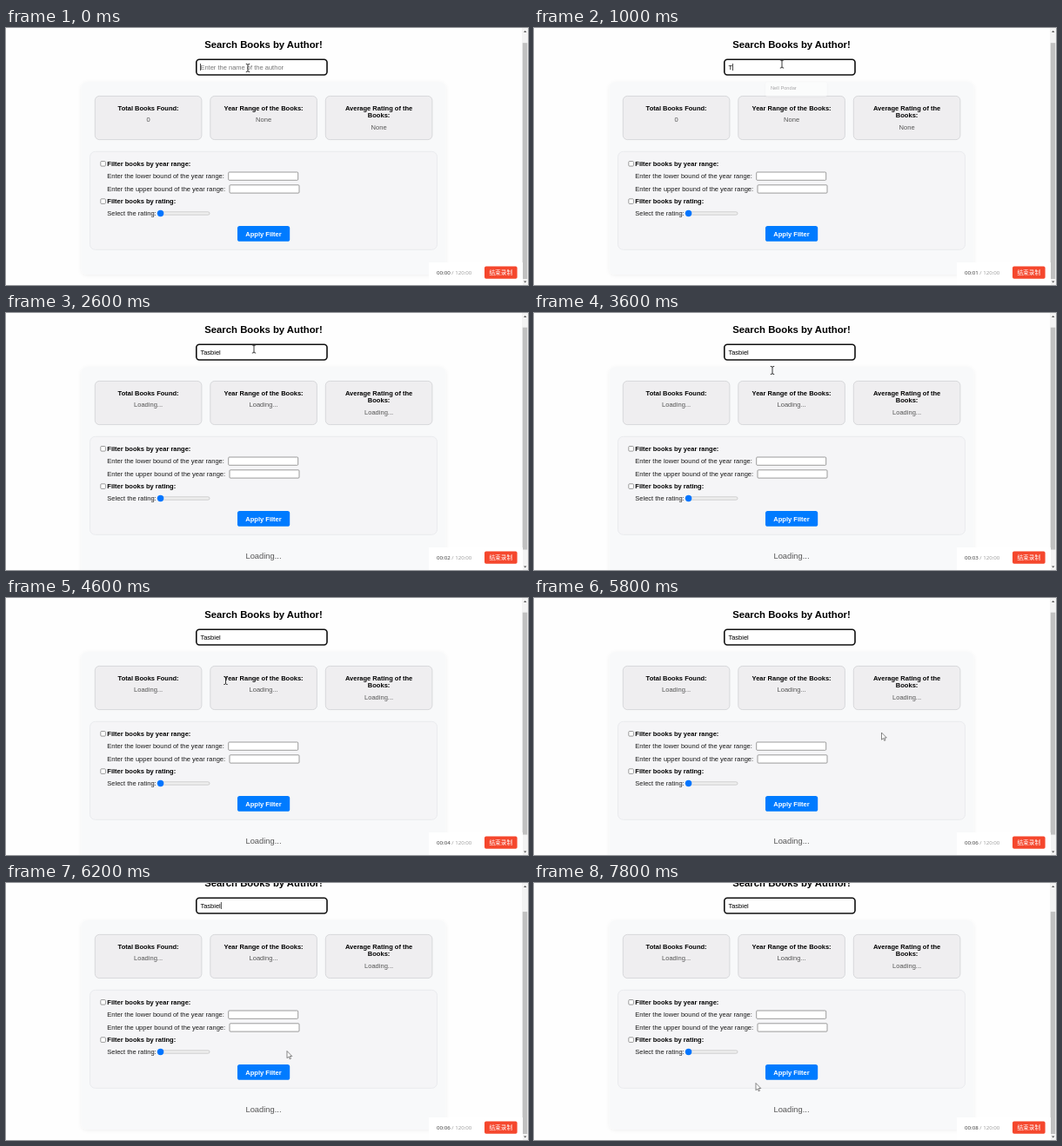
An HTML page for the animation above (8000 ms loop, 600x296 px).

```html
<!DOCTYPE html>
<html lang="en">
<head>
<meta charset="utf-8">
<title>Search Books by Author</title>
<style>
  html, body { margin: 0; width: 100%; height: 100%; overflow: hidden; background: #fff; }
  svg { display: block; width: 600px; height: 296px; }
  text { font-family: "Liberation Sans", Arial, sans-serif; font-size: 7.53px; fill: #1a1a1a; white-space: pre; }
  .b { font-weight: bold; fill: #000; }
  .m { text-anchor: middle; }
  .v { fill: #555; }
  .field { fill: #fff; stroke: #858585; stroke-width: .8; }
  .stat { fill: #efeef0; stroke: #d0d1d4; stroke-width: .8; }
</style>
</head>
<body>
<svg viewBox="0 0 600 296">
  <defs>
    <filter id="soft" x="-5%" y="-8%" width="110%" height="116%">
      <feDropShadow dx="0" dy="1" stdDeviation="2" flood-color="#000" flood-opacity=".06"/>
    </filter>
  </defs>
  <rect width="600" height="296" fill="#fefefe"/>
  <g id="page">
    <text class="b m" x="296" y="23.4" style="font-size:11.33px">Search Books by Author!</text>
    <rect id="card" x="86.5" y="62" width="419" height="222" rx="7" fill="#f8f9fa" filter="url(#soft)"/>
    <g id="stats"></g>
    <rect x="96.5" y="142.3" width="399" height="113" rx="6" fill="#f5f5f7" stroke="#e6e8eb" stroke-width=".8"/>
    <g id="form"></g>
    <text class="v m" id="wait" x="296" y="282.7" style="font-size:9.35px">Loading...</text>
    <rect x="218.8" y="36.2" width="150.2" height="17.8" rx="3.4" fill="#fff" stroke="#101010" stroke-width="1.6"/>
    <text id="hint" x="223.4" y="47.5" style="fill:#757575">Enter the name of the author</text>
    <text id="query" x="223.4" y="47.5" style="fill:#000"></text>
    <rect id="caret" y="41" width=".7" height="8" fill="#000"/>
    <g id="menu">
      <rect x="266.5" y="62.5" width="70" height="16.5" rx="1.5" fill="#fff" filter="url(#soft)"/>
      <text x="272" y="71.4" style="font-size:5.7px;fill:#555">Nell Pondar</text>
    </g>
  </g>

  <rect x="593" width="7" height="296" fill="#f3f3f3"/>
  <rect id="thumb" x="593.8" width="5.4" fill="#c1c1c1"/>
  <path d="M595 5l1.7-2 1.7 2zM595 291.5l1.7 2 1.7-2z" fill="#555"/>
  <rect x="486" y="270" width="108" height="26" fill="#fff"/>
  <text x="495" y="284" style="font-family:'Open Sans','Noto Sans',sans-serif;font-size:6.15px;fill:#999"><tspan id="clock" fill="#333"></tspan> / 120:00</text>
  <rect x="550" y="274.6" width="37.6" height="14.2" rx="1.8" fill="#f5472d"/>
  <text class="m" x="568.8" y="284.2" style="font-family:'Noto Sans CJK SC','Noto Sans CJK',sans-serif;font-size:6.7px;fill:#fff">结束录制</text>

  <path id="beam" d="M-2.2-4.6Q0-4.6 0-3.4Q0-4.6 2.2-4.6M0-3.6V3.6M-2.2 4.6Q0 4.6 0 3.4Q0 4.6 2.2 4.6" fill="none" stroke="#222" stroke-width=".9"/>
  <path id="arrow" d="M0 0V8.2L1.9 6.5 3.2 9.3 4.5 8.7 3.2 6H5.8Z" fill="#fff" stroke="#555" stroke-width=".7"/>
</svg>
<script>
const $ = id => document.getElementById(id);
const LOOP = 8000, STEP = 200, NAME = "Tasbiel";
const TRACK = 281, VIEW = 296;

const label = (x, y, s, cls = "") => `<text x="${x}" y="${y}" class="${cls}">${s}</text>`;
const box = (x, y, w, h, cls, rx = 1) =>
  `<rect x="${x}" y="${y}" width="${w}" height="${h}" rx="${rx}" class="${cls}"/>`;

const stats = [
  ["0", "Total Books Found:"],
  ["None", "Year Range of the Books:"],
  ["None", "Average Rating of the", "Books:"]
];
$("stats").innerHTML = stats.map(([value, ...lines], i) => {
  const x = 102.3 + i * 132.5, mid = x + 61.3;
  return box(x, 78.4, 122.6, 50.2, "stat", 5) +
    lines.map((s, k) => label(mid, 94.7 + k * 8.6, s, "b m")).join("") +
    label(mid, 99.5 + lines.length * 8.6, value, "v m");
}).join("");
const values = [...document.querySelectorAll("#stats .v")];

$("form").innerHTML =
  box(108.8, 153.5, 5.6, 5.6, "field") + label(116.3, 158.8, "Filter books by year range:", "b") +
  label(116.3, 173.2, "Enter the lower bound of the year range:") + box(255.7, 166, 80, 9.3, "field") +
  label(116.3, 187.9, "Enter the upper bound of the year range:") + box(257, 180.8, 80, 9.3, "field") +
  box(108.8, 196.8, 5.6, 5.6, "field") + label(116.3, 202.1, "Filter books by rating:", "b") +
  label(116.3, 216, "Select the rating:") +
  '<rect x="174" y="211.8" width="60" height="3.4" rx="1.7" fill="#efefef" stroke="#b6b6b6" stroke-width=".6"/>' +
  '<circle cx="177.6" cy="213.5" r="3.7" fill="#0075ff"/>' +
  '<rect x="266" y="228" width="60.2" height="17.8" rx="2.6" fill="#007bff"/>' +
  '<text x="296" y="239.5" class="b m" style="fill:#fff">Apply Filter</text>';

// pointer path: time, x, y
const path = [
  [0, 278, 46], [200, 285, 41.5], [3000, 285, 41.5], [3600, 274, 66], [4200, 256, 91],
  [4600, 252.5, 95], [5000, 300, 112], [5600, 392, 150], [5800, 399.5, 155], [6000, 372, 172],
  [6200, 323, 193.5], [6600, 268, 240], [6900, 240, 250], [7400, 255, 230.5], [8000, 255, 230.5]
];
function pointer(t) {
  const i = path.findIndex(p => p[0] > t);
  const [t0, x0, y0] = path[i - 1], [t1, x1, y1] = path[i];
  const k = (t - t0) / (t1 - t0);
  return [x0 + (x1 - x0) * k, y0 + (y1 - y0) * k];
}

const show = (id, on) => $(id).style.display = on ? "" : "none";

function typed(t) {
  if (t < 1000) return 0;
  return t < 2000 ? 1 + Math.floor((t - 1000) / 200) : NAME.length;
}

function caretOn(t) {
  if (t < 1000) return t < 600;
  return t < 2590 || (t - 2590) % 1004 >= 502;
}

function draw(t) {
  const loading = t >= 2400, shift = t >= 6000 ? 19 : 0;
  const n = typed(t);

  $("page").setAttribute("transform", `translate(0 ${-shift})`);
  $("card").setAttribute("height", loading ? 241 : 222);
  values.forEach((el, i) => el.textContent = loading ? "Loading..." : stats[i][0]);
  show("wait", loading);

  show("hint", n === 0);
  $("query").textContent = NAME.slice(0, n);
  $("caret").setAttribute("x", 223.2 + (n ? $("query").getComputedTextLength() + .3 : 0));
  show("caret", caretOn(t));
  show("menu", t >= 200 && t < 1200);
  $("menu").setAttribute("opacity", t < 1000 ? 1 : .5);

  const total = loading ? 325 : 306;
  $("thumb").setAttribute("y", 8 + TRACK * (10 + shift) / total);
  $("thumb").setAttribute("height", TRACK * VIEW / total);
  $("clock").textContent = "00:0" + Math.floor((t + 200) / 1000);

  const [x, y] = pointer(t), isBeam = t < 4800;
  show("beam", isBeam);
  show("arrow", !isBeam);
  $(isBeam ? "beam" : "arrow").setAttribute("transform", `translate(${x} ${y})`);
}

const start = performance.now();
function tick() {
  const t = (performance.now() - start) % LOOP;
  draw(Math.floor(t / STEP) * STEP);
  requestAnimationFrame(tick);
}
tick();
</script>
</body>
</html>
```
